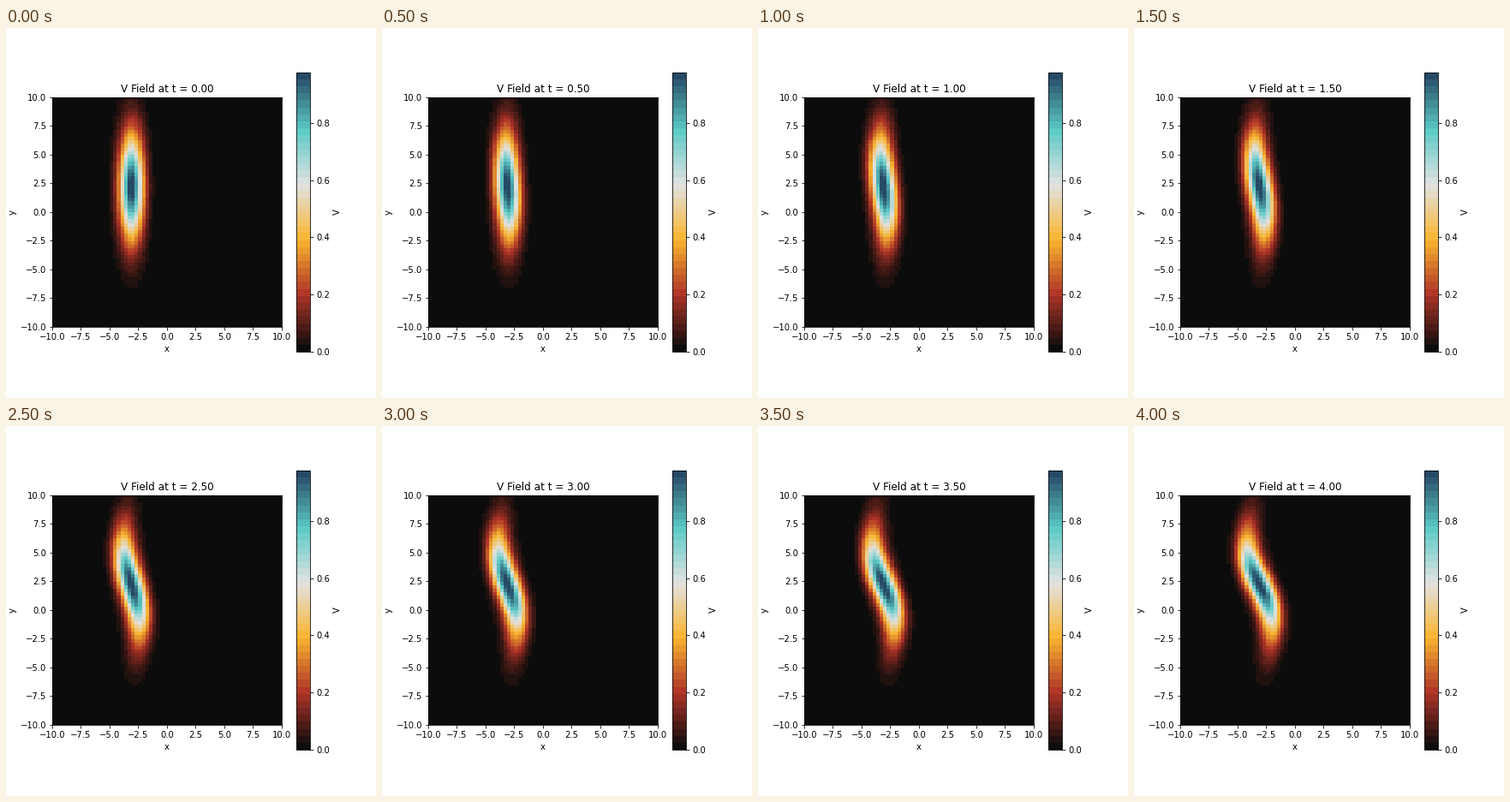
Recreate the animation shown at these times as a matplotlib script. Size 432 px wide and 432 px high, loop 4.5 s.

```python
import numpy as np
import matplotlib.pyplot as plt
from matplotlib.animation import FuncAnimation
from matplotlib.colors import LinearSegmentedColormap

N = 64
FRAMES, STEP, INTERVAL = 9, 0.5, 500
VMAX = 0.977
CX, CY = -np.pi, 2.25       # blob and vortex centre
SX, SY = 0.75, 3.3          # blob widths
OMEGA, CORE = 0.115, 4.2    # spin rate and vortex radius

cmap = LinearSegmentedColormap.from_list(
    "embers", ["#0c0c0c", "#b03428", "#f9b530", "#e2e2e2", "#5ccac6", "#264a66"], N=40)

axis = np.linspace(-10, 10, N)
X, Y = np.meshgrid(axis - CX, axis - CY)
spin = OMEGA * np.exp(-(X**2 + Y**2) / (2 * CORE**2))


def field(t):
    """Gaussian blob wound up by a vortex whose spin fades with radius."""
    c, s = np.cos(spin * t), np.sin(spin * t)
    x0, y0 = X * c + Y * s, Y * c - X * s
    return np.exp(-(x0 / SX)**2 / 2 - (y0 / SY)**2 / 2)


plt.rcParams["font.family"] = "DejaVu Sans"
fig, ax = plt.subplots(figsize=(6, 6), dpi=72)
fig.subplots_adjust(left=0.125, right=0.9, bottom=0.125, top=0.88)
image = ax.imshow(field(0), cmap=cmap, origin="lower", extent=(-10, 10, -10, 10),
                  vmin=0, vmax=VMAX, interpolation="nearest")
fig.colorbar(image, ax=ax, label="V")
ax.set(xlabel="x", ylabel="y")
ticks = np.arange(-10, 10.1, 2.5)
ax.set_xticks(ticks)
ax.set_yticks(ticks)
title = ax.set_title("V Field at t = 0.00")


def draw(i):
    t = i * STEP
    image.set_data(field(t))
    title.set_text(f"V Field at t = {t:.2f}")
    return image, title


anim = FuncAnimation(fig, draw, frames=FRAMES, interval=INTERVAL,
                     repeat=True, repeat_delay=0)
plt.show()
```
